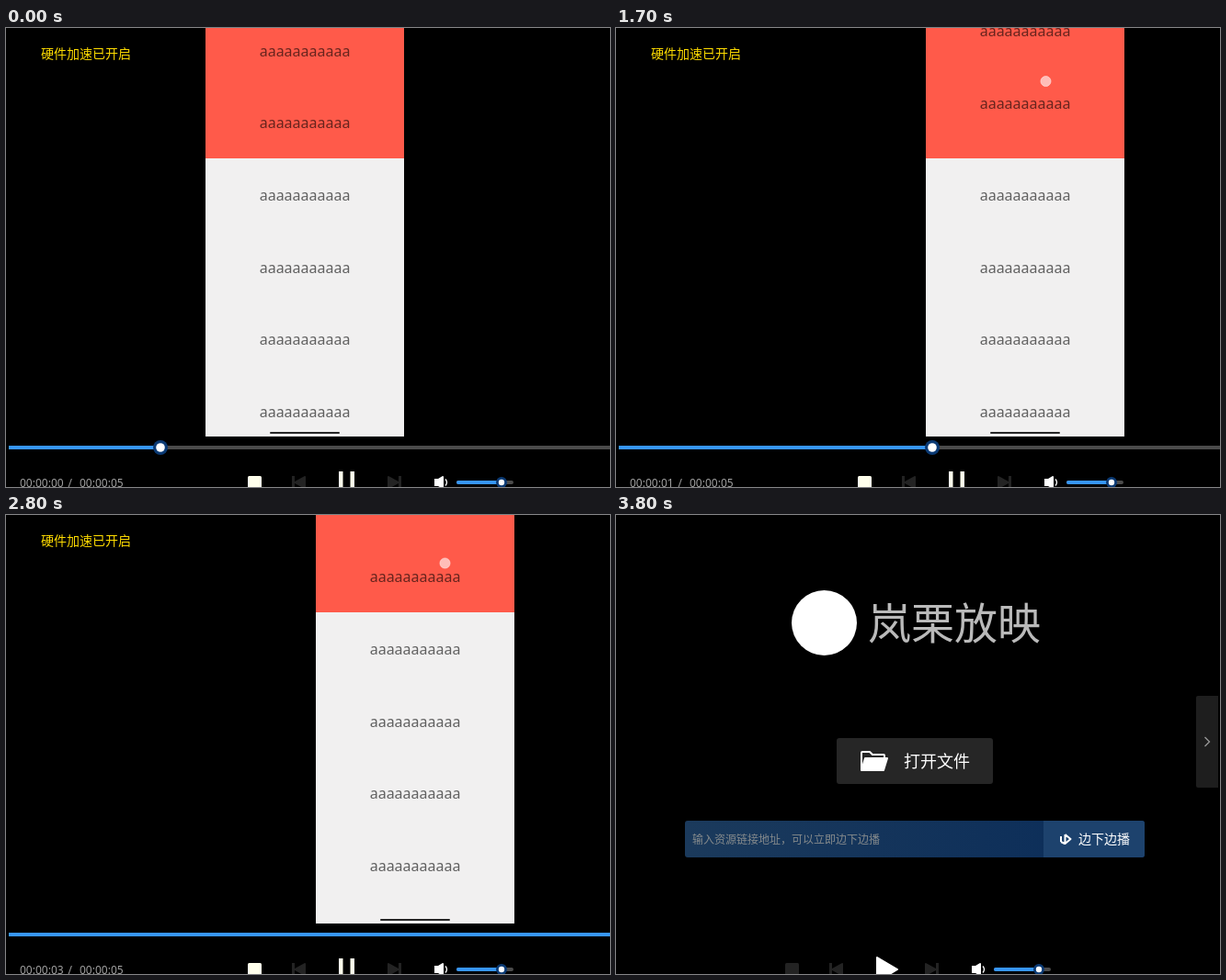
An HTML page that plays this animation: 657x500 px, repeating every 4000 ms.

```html
<!DOCTYPE html>
<html lang="zh-CN">
<head>
<meta charset="utf-8">
<title>Player</title>
<style>
  html, body { margin: 0; width: 100%; height: 100%; overflow: hidden; background: #000; }
  svg { display: block; font-family: "Noto Sans CJK SC", "Noto Sans CJK", sans-serif; }
  .row { font: 16px "Noto Sans", sans-serif; fill: #000; fill-opacity: .6; }
  .clock { font: 12px "Noto Sans", sans-serif; fill: #a0a0a0; }
  .lit { fill: #ffffec; }
  .dim { fill: #232323; }
</style>
</head>
<body>
<svg width="657" height="500" viewBox="0 0 657 500">
  <defs>
    <clipPath id="screen"><rect width="216" height="445"/></clipPath>
    <linearGradient id="field">
      <stop offset="0" stop-color="#1b3a5c"/>
      <stop offset="1" stop-color="#0a2c59"/>
    </linearGradient>
  </defs>
  <rect width="657" height="500"/>

  <g id="playing">
    <g id="phone"><g clip-path="url(#screen)">
      <g id="page">
        <rect width="216" height="143" fill="#ff5a4a"/>
        <g id="innerRows"></g>
        <rect y="142" width="216" height="700" fill="#f1f0f0"/>
        <g id="outerRows"></g>
      </g>
      <rect x="70" y="440" width="76" height="2" rx="1" fill="#262626"/>
    </g></g>
    <circle id="touch" r="5.5" fill="#ffbdb8" stroke="#ffdad7" stroke-opacity=".75"/>
    <text id="notice" x="38" y="33" font-size="14" fill="#ffdc00">硬件加速已开启</text>

    <rect x="3" y="455" width="654" height="4" fill="#4b4b4b"/>
    <rect id="progress" x="3" y="455" height="4" fill="#3796fa"/>
    <g id="handle">
      <circle cy="457" r="8" fill="#0b3a74"/>
      <circle cy="457" r="4.8" fill="#fff"/>
    </g>
    <text id="elapsed" class="clock" x="15" y="500"></text>
    <text class="clock" x="67.5" y="500">/</text>
    <text class="clock" x="80" y="500">00:00:05</text>
  </g>

  <g id="home">
    <circle cx="226.5" cy="117.5" r="35.5" fill="#fff"/>
    <text x="274" y="135" font-size="47" fill="#bababa">岚栗放映</text>
    <rect x="240" y="243" width="170" height="50" rx="3" fill="#262626"/>
    <path d="M267 278V259q0-1 1-1h8l3 3h12q1 0 1 1v3M267 278l4-13h24l-4 13z" fill="none" stroke="#fff" stroke-width="2" stroke-linejoin="round"/>
    <path d="M267 279l4-14h24l-4 14z" fill="#fff"/>
    <text x="313" y="275" font-size="18" fill="#fff">打开文件</text>
    <rect x="75" y="333" width="500" height="40" rx="3" fill="url(#field)"/>
    <path d="M465 333h107q3 0 3 3v34q0 3-3 3h-107z" fill="#1d426d"/>
    <text x="83" y="357.5" font-size="12" fill="#858a8c">输入资源链接地址，可以立即边下边播</text>
    <path d="M484 350v6M488.500 348v10l6-5-6-5M484 356l4 2" fill="none" stroke="#fff" stroke-width="2" stroke-linejoin="round"/>
    <text x="503" y="358" font-size="14" font-weight="500" fill="#fff">边下边播</text>
    <path d="M655 197h-22q-2 0-2 2v96q0 2 2 2h22z" fill="#1e1e1e"/>
    <path d="M640.500 242l5 5-5 5" fill="none" stroke="#999" stroke-width="1.300"/>
  </g>

  <g id="controls">
    <rect id="stop" x="263" y="488" width="15" height="15" rx="1.500"/>
    <path class="dim" d="M311 488h3v6l11-6q1 0 1 1v12q0 1-1 1l-11-6v6h-3z"/>
    <path class="dim" d="M430 488h-3v6l-11-6q-1 0-1 1v12q0 1 1 1l11-6v6h3z"/>
    <path id="pause" class="lit" d="M362 483h4.500v24h-4.500zM374.500 483h4.500v24h-4.500z"/>
    <path id="play" d="M363 482l22 13-22 13z" fill="#fff" stroke="#fff" stroke-width="2" stroke-linejoin="round"/>
    <path d="M466 491h4l5-3q1 0 1 1v12q0 1-1 1l-5-3h-4z" fill="#fff"/>
    <path d="M478 491.500q3 3.500 0 7" fill="none" stroke="#fff" stroke-width="1.300"/>
    <rect x="490" y="493" width="62" height="4" rx="2" fill="#4b4b4b"/>
    <rect x="490" y="493" width="49" height="4" rx="2" fill="#3796fa"/>
    <circle cx="539" cy="495" r="6" fill="#0b3a74"/>
    <circle cx="539" cy="495" r="3.200" fill="#fff"/>
  </g>
</svg>
<script>
const $ = id => document.getElementById(id);
const LOOP = 4000, STEP = 100, PITCH = 78.6, INNER_END = 3 * PITCH;

// Each swipe drags from start to release, then coasts until end. Times are in steps.
const swipes = [
  { start: 8, release: 10, end: 14, from: 4, drop: 53.6, rest: 84.6, tau: 1.3, power: 1, x: 485, touch: 61.6 },
  { start: 16, release: 18, end: 24, from: 84, drop: 137, rest: 231.5, tau: 2, power: 1.74, x: 467.5, touch: 157.9 },
  { start: 26, release: 30, end: 37, from: 232, drop: 312, rest: 343.5, tau: 2, power: 1, x: 477.5, touch: 324.5 }
];

function scrollAt(step, s) {
  if (!s) return 0;
  if (step <= s.release) {
    const p = (step - s.start) / (s.release - s.start);
    return s.from + (s.drop - s.from) * p ** s.power;
  }
  const coast = Math.min(step, s.end) - s.release;
  return s.drop + (s.rest - s.drop) * (1 - Math.exp(-coast / s.tau));
}

function addRows(group, first, count) {
  for (let i = 0; i < count; i++) {
    const row = document.createElementNS("http://www.w3.org/2000/svg", "text");
    row.setAttribute("class", "row");
    row.setAttribute("x", 58.7);
    row.setAttribute("y", first + i * PITCH);
    row.textContent = "a".repeat(11);
    group.append(row);
  }
}

const show = (id, on) => $(id).setAttribute("display", on ? "inline" : "none");
const move = (id, x, y) => $(id).setAttribute("transform", `translate(${x} ${y})`);

function render(ms) {
  const step = Math.floor(ms / STEP);
  const home = step >= 38;
  show("home", home);
  show("playing", !home);
  show("play", home);
  show("pause", !home);
  $("stop").setAttribute("class", home ? "dim" : "lit");
  move("controls", home ? -79 : 0, 0);
  if (home) return;

  const swipe = swipes.filter(s => s.start <= step).pop();
  const scroll = scrollAt(step, swipe);
  const inner = Math.min(scroll, INNER_END);
  move("phone", step < 4 ? 217 : 337, 0);
  move("innerRows", 0, -inner);
  move("page", 0, Math.round(inner - scroll));

  const touching = swipe && step <= swipe.release;
  show("touch", touching);
  if (touching) move("touch", swipe.x, swipe.touch - scroll);

  const second = Math.floor(step / 9);
  const head = 168 + 176 * second;
  $("elapsed").textContent = "00:00:0" + second;
  $("progress").setAttribute("width", Math.min(head, 657) - 3);
  move("handle", head, 0);
  show("notice", step < 34);
}

addRows($("innerRows"), 30.5, 5);
addRows($("outerRows"), 188, 6);

const began = performance.now();
function tick() {
  render((performance.now() - began) % LOOP);
  requestAnimationFrame(tick);
}
tick();
</script>
</body>
</html>
```
